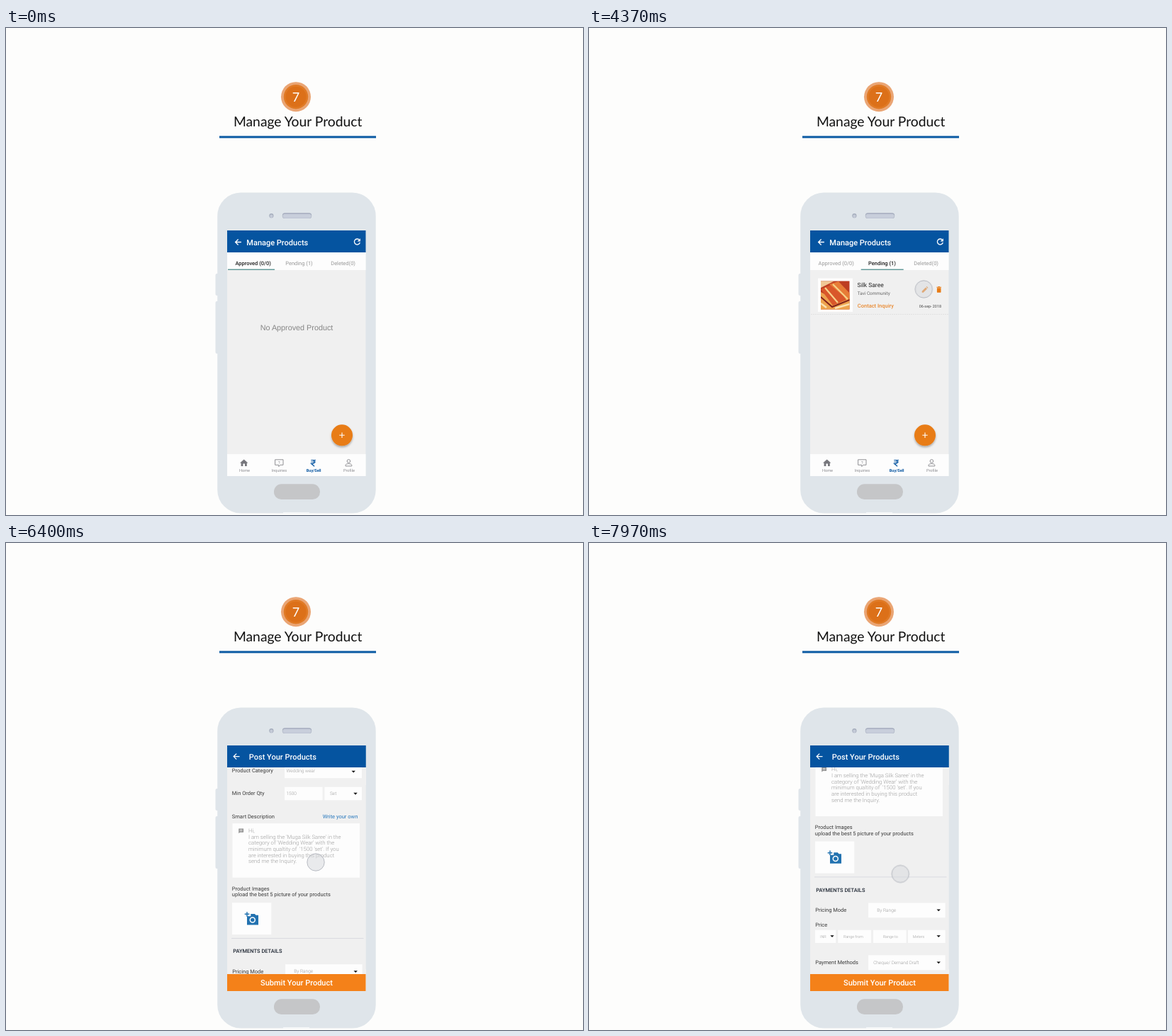
Recreate the animation shown at these times as an HTML page. Size 814 by 688 pixels, loop 8000 ms.

```html
<!DOCTYPE html>
<html lang="en">
<head>
<meta charset="utf-8">
<title>Manage Your Product</title>
<style>
  html, body { margin: 0; width: 100%; height: 100%; overflow: hidden; background: #fdfdfc; }
  svg { display: block; width: 100%; height: 100%; }
  text { font-family: Roboto, sans-serif; font-size: 7.5px; fill: #3a3a3a; text-rendering: geometricPrecision; }
  .title { font: 19.3px Lato, sans-serif; fill: #111; text-anchor: middle; }
  .step { font: 18px Lato, sans-serif; fill: #fff; text-anchor: middle; }
  .bar { font-size: 11px; font-weight: 500; fill: #fff; }
  .mid { text-anchor: middle; }
  .tab { fill: #999; text-anchor: middle; }
  .tab.on { fill: #222; font-weight: 500; }
  .empty { font: 10.8px "Liberation Sans", Arial, sans-serif; fill: #858585; text-anchor: middle; }
  .nav text { font-size: 5.6px; fill: #8b8b90; text-anchor: middle; }
  .nav .active { font-size: 5.5px; font-weight: 700; fill: #0554a0; }
  .hint text, text.hint { font-size: 6.5px; font-weight: 300; fill: #999; }
  .hint .tiny { font-size: 5.4px; }
  .note text { font-size: 7.75px; font-weight: 300; fill: #9b9b9b; }
  .section { font-weight: 500; fill: #1f2733; }
  .box { fill: #fdfdfd; }
  .line { fill: none; stroke: #fff; stroke-width: 1.3; }
  .thin { fill: none; stroke: #85858a; stroke-width: .9; }
  .orange { fill: #e87b14; }

  /* One timeline of 8 s drives every part. */
  .approved, .pending, .form, .scroll, .touch { animation: 8s infinite; }
  .approved { animation-name: approved; animation-timing-function: step-end; }
  .pending { animation-name: pending; animation-timing-function: step-end; }
  .form { animation-name: form; animation-timing-function: step-end; }
  .scroll { animation-name: scroll; animation-timing-function: linear; }
  .touch { animation-name: touch; animation-timing-function: linear; }

  @keyframes approved { 0% { visibility: visible } 27.5%, 100% { visibility: hidden } }
  @keyframes pending { 0% { visibility: hidden } 27.5% { visibility: visible } 58.75%, 100% { visibility: hidden } }
  @keyframes form { 0% { visibility: hidden } 58.75%, 100% { visibility: visible } }
  @keyframes scroll {
    0% { transform: translateY(45.5px) }
    73.375% { transform: translateY(45.5px); animation-timing-function: cubic-bezier(.333, .5, .667, .9) }
    92.56%, 100% { transform: translateY(-119.5px) }
  }
  @keyframes touch {
    0%, 20.5% { transform: translate(410.2px, 344px); opacity: 0 }
    23%, 26.5% { transform: translate(410.2px, 344px); opacity: 1 }
    28% { transform: translate(410.2px, 344px); opacity: 0 }
    50% { transform: translate(472.3px, 369px); opacity: 0 }
    52.5%, 57% { transform: translate(472.3px, 369px); opacity: 1 }
    58.7% { transform: translate(472.3px, 369px); opacity: 0 }
    73.3% { transform: translate(437px, 452px); opacity: 0 }
    80%, 91% { transform: translate(437px, 451px); opacity: 1 }
    93% { transform: translate(437px, 451px); opacity: 0 }
    96% { transform: translate(439.3px, 467.5px); opacity: 0 }
    98.5%, 100% { transform: translate(439.3px, 467.5px); opacity: 1 }
  }
</style>
</head>
<body>
<svg viewBox="0 0 814 688">
  <defs>
    <clipPath id="view"><rect x="312" y="317" width="195.5" height="292"/></clipPath>
    <clipPath id="photo"><rect x="327" y="357.5" width="40.5" height="40"/></clipPath>
    <filter id="shadow" x="-30%" y="-30%" width="160%" height="170%">
      <feDropShadow dx="0" dy="2" stdDeviation="1.5" flood-color="#000" flood-opacity=".32"/>
    </filter>
    <path id="caret" d="M-2.7-1.3H2.7L0 1.5Z" fill="#111"/>
    <path id="back" class="line" d="M4.3 0H-4M0-4L-4 0L0 4"/>
  </defs>

  <!-- Heading -->
  <circle cx="409" cy="97.2" r="21" fill="#eaa574"/>
  <circle cx="409" cy="97.2" r="17.2" fill="#e07a25"/>
  <circle cx="409" cy="97.2" r="14.5" fill="#dc7019"/>
  <text class="step" x="409" y="103.6">7</text>
  <text class="title" x="411.7" y="138.7">Manage Your Product</text>
  <rect x="301" y="152.5" width="221" height="3" fill="#0a5aa3"/>

  <!-- Phone -->
  <g fill="#dfe5ea">
    <rect x="295.5" y="347" width="6" height="31" rx="2"/>
    <rect x="295.5" y="386" width="6" height="74" rx="2"/>
    <rect x="298.2" y="232.5" width="223.5" height="453" rx="33"/>
  </g>
  <rect x="391" y="684" width="37" height="2" fill="#f4f6f8"/>
  <circle cx="374.4" cy="265.2" r="3.1" fill="#a5acbc"/>
  <circle cx="374.4" cy="265.8" r="2.2" fill="#c5cbd8"/>
  <rect x="389.8" y="261.3" width="41.4" height="7.8" rx="3.6" fill="#a4abbd"/>
  <rect x="390.3" y="262.8" width="40.4" height="6" rx="3" fill="#c8cedb"/>
  <rect x="378" y="644.3" width="65" height="21.7" rx="10.6" fill="#c5c6c8"/>
  <rect x="312" y="286" width="195.5" height="347" fill="#f0f0f0"/>
  <rect x="312" y="286" width="195.5" height="31" fill="#0554a0"/>

  <!-- Parts shared by both product lists -->
  <g id="list">
    <rect x="312" y="317" width="195.5" height="25" class="box"/>
    <g class="approved">
      <text class="tab on" x="348.7" y="335.2">Approved (0/0)</text>
      <text class="tab" x="413.5" y="335.2">Pending (1)</text>
      <rect x="313" y="340.6" width="66" height="1.3" fill="#4f8d8c"/>
      <text class="empty" x="410" y="427.2">No Approved Product</text>
    </g>
    <g class="pending">
      <text class="tab" x="348.7" y="335.2">Approved (0/0)</text>
      <text class="tab on" x="413.5" y="335.2">Pending (1)</text>
      <rect x="383.7" y="340.6" width="60" height="1.3" fill="#4f8d8c"/>

      <rect x="323" y="353.5" width="49" height="47.5" class="box"/>
      <g clip-path="url(#photo)">
        <rect x="327" y="357" width="41" height="41" fill="#bd3d22"/>
        <path d="M327 357H347L327 367Z" fill="#f0c795"/>
        <path d="M327 373L350 385L368 373V398H327Z" fill="#eda24d"/>
        <path d="M327 369L346 361L363 384L344 392Z" fill="#d9572a"/>
        <path d="M339 362L352 358L368 375V386Z" fill="#e77c36"/>
        <path d="M333 367L351 388M344 362L365 383" stroke="#f7d28a" stroke-width="2.2"/>
        <path d="M327 380L343 394L368 384" stroke="#83221a" stroke-width="2" fill="none"/>
        <path d="M327 389L335 395M347 396L368 390" stroke="#fae2b0" stroke-width="2.5"/>
      </g>
      <text x="378.6" y="366.2" style="font-size:8.5px;fill:#222">Silk Saree</text>
      <text x="378.8" y="376.7" style="font-size:6.4px;fill:#666">Tavi Community</text>
      <text x="378.8" y="395.2" style="font-weight:500;fill:#e98a32">Contact Inquiry</text>
      <text x="465.8" y="395" style="font-size:5.4px;fill:#444">06-sep- 2018</text>
      <path d="M313 404.5H507" stroke="#dedede" stroke-width=".8" stroke-dasharray="2 1"/>
      <path class="orange" d="M469.7 373.7V371.7L475 366.4L477 368.4L471.7 373.7ZM475.6 365.8L476.5 364.9L478.5 366.9L477.6 367.8Z"/>
      <path class="orange" d="M490.4 365.7H492.2L492.8 365H494.6L495.2 365.7H497V366.7H490.4ZM490.9 367.3H496.5V372.9Q496.5 373.8 495.6 373.8H491.8Q490.9 373.8 490.9 372.9Z"/>
    </g>
    <text class="tab" x="475.6" y="335.2">Deleted(0)</text>
    <use href="#back" x="327.6" y="302.5"/>
    <text class="bar" x="339.3" y="306.5">Manage Products</text>
    <path class="line" d="M498.3 299.2A4 4 0 1 0 499.3 303"/>
    <path d="M499.9 297.3V301.6H495.6Z" fill="#fff"/>

    <circle class="orange" cx="474" cy="575.3" r="15" filter="url(#shadow)"/>
    <path class="line" d="M470.3 575.3H477.7M474 571.6V579" style="stroke-width:1.1"/>
    <g class="nav">
      <rect x="312" y="602" width="195.5" height="31" class="box"/>
      <path d="M335.7 609.4L341.4 614.5H339.8V619H337V615.6H334.4V619H331.6V614.5H330Z" fill="#77777c"/>
      <text x="336.5" y="627">Home</text>
      <path class="thin" d="M379.6 609.8H391V617.3H386.8L384.8 619.6V617.3H379.6Z"/>
      <text x="385.3" y="615.7">?</text>
      <text x="385.4" y="627">Inquiries</text>
      <path d="M430.3 610.5H437M430.3 613H437M430.3 610.5H432.2C436.3 610.5 436.3 615.3 432.2 615.3H430.5L435.1 619.3" fill="none" stroke="#0554a0" stroke-width="1.2"/>
      <text class="active" x="434.2" y="627">Buy/Sell</text>
      <circle class="thin" cx="483.4" cy="611.9" r="2.3"/>
      <path class="thin" d="M479 618.9V617.7C479 614.8 487.8 614.8 487.8 617.7V618.9Z"/>
      <text x="484" y="627">Profile</text>
    </g>
  </g>

  <!-- Product form -->
  <g class="form">
    <rect x="312" y="286" width="195.5" height="31" fill="#0554a0"/>
    <rect x="312" y="317" width="195.5" height="316" fill="#f0f0f0"/>
    <use href="#back" x="325.2" y="301.6"/>
    <text class="bar" x="342.8" y="305.5">Post Your Products</text>
    <g clip-path="url(#view)">
      <g class="scroll">
        <text class="section" x="320.3" y="293.7">PRODUCT DETAILS</text>
        <text x="318.8" y="322.5">Product Name</text>
        <text x="318.8" y="356.6">Product Category</text>
        <text x="318.8" y="389.2">Min Order Qty</text>
        <g class="box">
          <rect x="393" y="310.5" width="109" height="20.5"/>
          <rect x="393" y="344" width="109" height="21"/>
          <rect x="393" y="377.5" width="53.5" height="18.7"/>
          <rect x="449.5" y="377.5" width="52.5" height="18.7"/>
        </g>
        <g class="hint">
          <text x="395.5" y="323.6">Muga Silk Saree</text>
          <text x="395.5" y="356.7">Wedding wear</text>
          <text x="395.5" y="389.2">1500</text>
          <text x="457" y="389.2">Set</text>
        </g>
        <use href="#caret" x="490.2" y="355.8"/>
        <use href="#caret" x="493" y="387"/>

        <text x="318.8" y="422.2">Smart Description</text>
        <text x="446.7" y="422.2" style="fill:#2878bd">Write your own</text>
        <rect x="319.5" y="429" width="179.5" height="76.5" class="box"/>
        <path d="M328.3 436.3H335V441.5H330L328.3 443.1Z" fill="#8c8c8c"/>
        <path d="M329.6 438H333.7M329.6 439.7H333.7" stroke="#fff" stroke-width=".7"/>
        <g class="note">
          <text x="342" y="441.9">Hi,</text>
          <text x="342" y="450.5">I am selling the 'Muga Silk Saree' in the</text>
          <text x="342" y="459.1">category of 'Wedding Wear' with the</text>
          <text x="342" y="467.7">minimum qualtity of &#160;'1500 'set'. If you</text>
          <text x="342" y="476.4">are interested in buying this product</text>
          <text x="342" y="485">send me the Inquiry.</text>
        </g>

        <text x="318.8" y="523.6">Product Images</text>
        <text x="318.8" y="532.3">upload the best 5 picture of your products</text>
        <rect x="319" y="541" width="55.3" height="45" class="box"/>
        <path d="M340 560.2V572.3H356V558.7H352.6L350.8 556.8H345.3V560.2Z" fill="#2272b0"/>
        <circle cx="347.8" cy="565.4" r="3.5" fill="#2272b0" stroke="#fff" stroke-width="1.5"/>
        <path d="M336.7 557.2H343.3M340 554V560.5" stroke="#2272b0" stroke-width="1.5"/>

        <path d="M318 591.4H504.5" stroke="#d9dae0" stroke-width="1"/>
        <text class="section" x="320.3" y="612">PAYMENTS DETAILS</text>
        <text x="319.2" y="640.6">Pricing Mode</text>
        <text x="319.2" y="661.6">Price</text>
        <text x="319.2" y="714.3">Payment Methods</text>
        <g class="box">
          <rect x="394" y="628" width="108.5" height="20.7"/>
          <rect x="319" y="666.3" width="29.3" height="18.2"/>
          <rect x="351.3" y="666.3" width="46.7" height="18.2"/>
          <rect x="401" y="666.3" width="46.5" height="18.2"/>
          <rect x="450" y="666.3" width="52.5" height="18.2"/>
          <rect x="394" y="701.8" width="108.5" height="21"/>
        </g>
        <g class="hint">
          <text x="406.3" y="640.3">By Range</text>
          <text class="tiny" x="326" y="677">INR</text>
          <text class="tiny" x="359" y="677">Range from</text>
          <text class="tiny" x="414.7" y="677">Range to</text>
          <text class="tiny" x="456.8" y="677">Meters</text>
          <text x="401.2" y="714.2" style="font-size:6.4px">Cheque/ Demand Draft</text>
        </g>
        <use href="#caret" x="493.2" y="638.3"/>
        <use href="#caret" x="343" y="675"/>
        <use href="#caret" x="493.2" y="675"/>
        <use href="#caret" x="493.2" y="712.2"/>
      </g>
    </g>
    <rect x="312" y="609" width="195.5" height="24" fill="#f48119"/>
    <text class="bar mid" x="410" y="625.4">Submit Your Product</text>
  </g>

  <circle class="touch" r="12.2" fill="#d6d8dc" fill-opacity=".5" stroke="#a9adb5" stroke-width=".8"/>
</svg>
</body>
</html>
```
